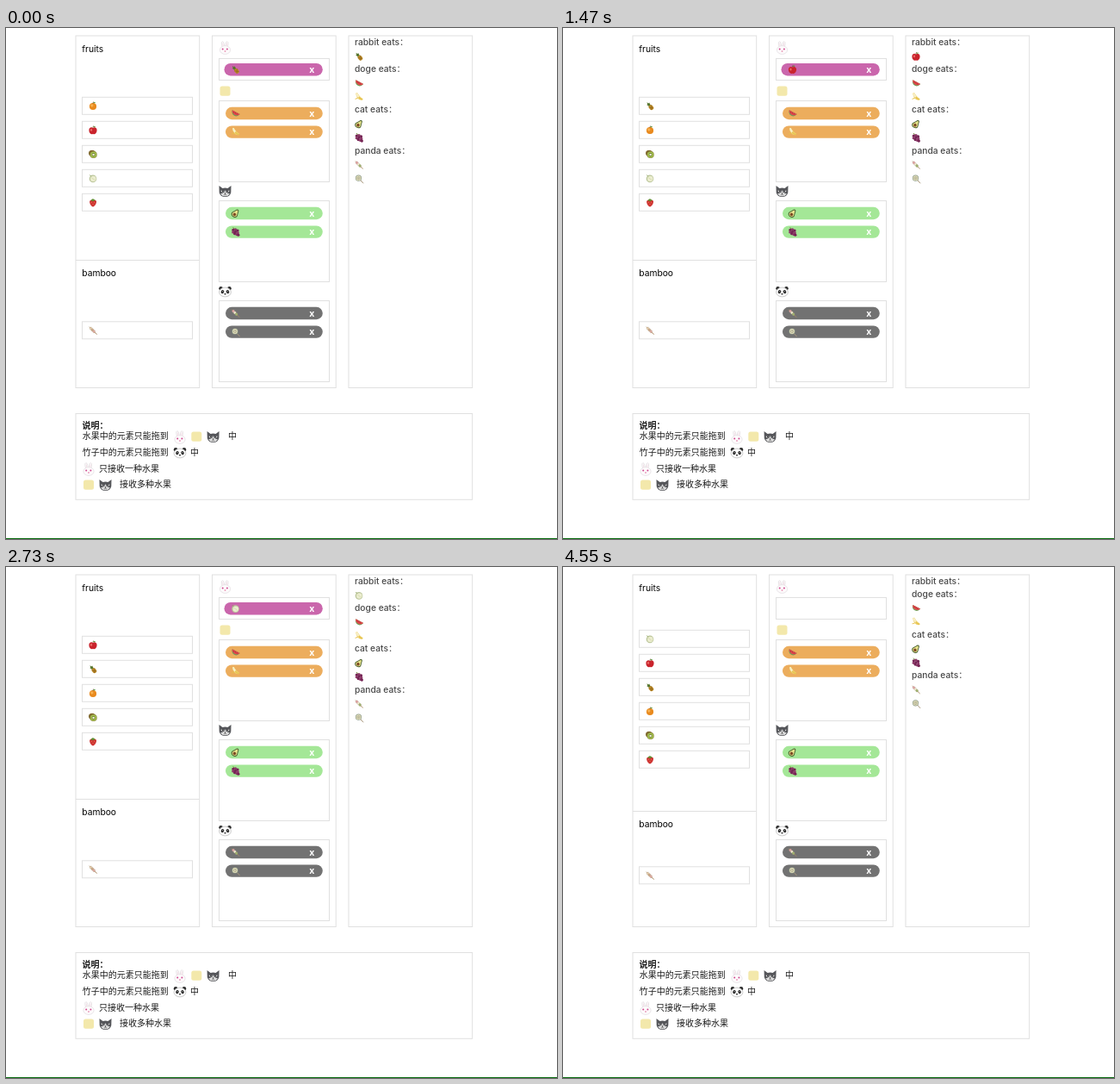
An HTML page for the animation above (4.62 s loop, 640 by 593 pixels).

```html
<!DOCTYPE html>
<html lang="zh-CN">
<head>
<meta charset="utf-8">
<title>Feeding board</title>
<style>
  html, body { margin: 0; width: 100%; height: 100%; overflow: hidden; background: #fff; }
  svg { display: block; width: 100%; height: 100%; }
  text { font: 10.25px Inter, "Noto Sans CJK SC", "Noto Sans CJK", sans-serif; white-space: pre; }
  .eats { fill: #484848; font-weight: 500; }
  .note { font-size: 10px; font-family: "Noto Sans CJK SC", "Noto Sans CJK", serif; fill: #1a1a1a; }
  .bold { font-weight: 700; }
  .close { font-size: 10.5px; font-weight: 700; fill: #fff; text-anchor: middle; }
  .frame { fill: none; stroke: #e0e0e0; }
</style>
</head>
<body>
<svg id="stage" viewBox="0 0 640 593" preserveAspectRatio="none"></svg>
<script>
const LOOP = 4620, STEP = 70;
const stage = document.getElementById('stage');

// Small drawing helpers
const dot = (x, y, r, fill, more = '') => `<circle cx="${x}" cy="${y}" r="${r}" fill="${fill}" ${more}/>`;
const oval = (x, y, rx, ry, fill, more = '') => `<ellipse cx="${x}" cy="${y}" rx="${rx}" ry="${ry}" fill="${fill}" ${more}/>`;
const path = (d, fill, more = '') => `<path d="${d}" fill="${fill}" ${more}/>`;
const line = (d, color, w, more = '') => path(d, 'none', `stroke="${color}" stroke-width="${w}" stroke-linecap="round" ${more}`);
const turn = (deg, body) => `<g transform="rotate(${deg})">${body}</g>`;
const text = (x, y, str, cls = '') => `<text x="${x}" y="${y}" class="${cls}">${str}</text>`;
const frame = (x1, y1, x2, y2) => `<rect class="frame" x="${x1}" y="${y1}" width="${x2 - x1}" height="${y2 - y1}"/>`;
const icon = (name, x, y, more = '') => `<use href="#${name}" x="${x}" y="${y}" ${more}/>`;

const skewer = colors => turn(-45,
  line('M0-5.6V6.2', '#a98a62', 0.9) +
  colors.map((c, i) => dot(0, -3.4 + i * 2.5, 1.5, c, 'stroke="#a59a83" stroke-width=".3"')).join(''));

const leafTop = line('M0-3.2L.5-4.6', '#6d4a25', 0.7) + path('M.3-3.5Q1.4-5.2 3-4.3Q2.2-3 .3-3.5Z', '#4b8f2c');

const grapeSpots = [[-2.6, -2.2], [0, -2.8], [2.5, -1.5], [-2.7, .3], [0, -.2], [2.7, 1.1], [-.8, 2.1], [1.5, 2.9], [3.3, 3.6]];

const icons = {
  orange: dot(0, .5, 4.1, '#e98a1e') + dot(-1.2, -.6, 1.7, '#f6b050') + leafTop,
  apple: path('M0-2.6C2-4.2 4.8-2.8 4.6.4C4.4 3 2.6 5 .9 4.7Q0 4.4-.9 4.7C-2.6 5-4.5 3-4.6.4C-4.8-2.8-2-4.2 0-2.6Z', '#c9232c') +
    oval(-2, -.3, 1.1, 1.5, '#ea6a64') + leafTop,
  kiwi: oval(-1, -1.3, 4, 3.5, '#80692f') + dot(.6, .5, 4.1, '#86803a') + dot(.6, .5, 3.5, '#a4c04c') +
    dot(.6, .5, 1.9, '#5c6c2c') + dot(.6, .5, 1.3, '#f3f2d2'),
  melon: dot(0, .4, 4.3, '#bac59a') + dot(.3, .5, 3.3, '#ebedcf') +
    line('M-2.2-1.2L2.4 2.2', '#d3d9ae', 0.8) + line('M-2.4-2.6L-3.4-3.7', '#8ba05a', 0.9),
  strawberry: path('M-3.8-1.5C-3-3.8 3-3.8 4-1.5C4.4 1 1.7 5 0 5C-1.8 5-4.3 1-3.8-1.5Z', '#cf3433') +
    [[-1.8, 0], [1.6, .2], [0, 2]].map(([x, y]) => dot(x, y, .4, '#f3c66a')).join('') +
    path('M-3.1-2.3L-1.3-3.6L0-4.6L1.2-3.6L3.1-2.4L1.2-2.1L0-1.3L-1.3-2.1Z', '#5d9132'),
  pineapple: turn(-40,
    oval(0, 2.1, 2.4, 3.2, '#bd8a26') + line('M-1.8 .6L1.4 4.2M1.8 .6L-1.4 4.2', '#7d5a1c', 0.5) +
    path('M-1.2-.6L-2-3.6L-.8-3.3L0-5.6L.8-3.3L2-3.6L1.2-.6Z', '#55742c')),
  watermelon: turn(28,
    path('M-5-1.5H5Q4.2 3 0 3.1Q-4.2 3-5-1.5Z', '#6ea05a') + path('M-5-1.5H5Q4 1.9 0 2Q-4 1.9-5-1.5Z', '#e5474c') +
    [-2, 0, 2].map(x => dot(x, -.1, .4, '#4b1d1c')).join('')),
  banana: path('M-3.6-4.6L-1.8-4.8C-.4-2.6 1 .4 4.4 1.9L4.2 3.4C1 4.6-3.6 1.2-3.6-4.6Z', '#ecd06a') +
    path('M-3.4-4.4L-1.8-4.6Q-1-2.6 .6-.8L-.8 1.4Q-3.4-1-3.4-4.4Z', '#f8efc8') +
    line('M-1.6 1.2Q-2.8 2.2-4 2.2M0 .4Q2 3 3.8 2.8', '#e6c04a', 1.1),
  avocado: turn(38,
    path('M0-5.2C2-5.2 2 -2.2 3.2-.3C5 3 2.6 5 0 5C-2.6 5-5 3-3.2-.3C-2-2.2-2-5.2 0-5.2Z', '#43592a') +
    path('M0-4.2C1.2-4.2 1.3-1.7 2.4 0C3.7 2.6 2 4.1 0 4.1C-2 4.1-3.7 2.6-2.4 0C-1.3-1.7-1.2-4.2 0-4.2Z', '#e6e38c') +
    dot(0, 1.7, 1.8, '#7d4c26')),
  grapes: line('M-1-3L-2.6-5', '#6f8a37', 1) +
    grapeSpots.map(([x, y], i) => dot(x, y, 1.65, i % 2 ? '#8d3868' : '#742454')).join(''),
  oden: skewer(['#e7cfb0', '#cda887', '#e0a9a0']),
  dango: skewer(['#e5a3a8', '#f1ead0', '#9fb46c']),
  lollipop: line('M1 1L4.8 5.2', '#a8977c', 1) + dot(-.5, -.6, 3.6, '#8c9a88') + dot(-.5, -.6, 2.9, '#e4e0bc') +
    line('M-.5-.6q1-1 1.4.3q0 1.5-1.8 1.4q-1.8-.7-1.1-2.4q1.3-1.4 3-.2', '#9a9a80', 0.7),
  rabbit: `<g fill="#fdfbfc" stroke="#dcd6da" stroke-width=".6">
    <ellipse cx="-2.6" cy="-3.8" rx="1.5" ry="3.6" transform="rotate(-10 -2.6 -3.8)"/>
    <ellipse cx="2" cy="-3.8" rx="1.5" ry="3.6" transform="rotate(8 2 -3.8)"/>
    <ellipse cy="2.5" rx="6.1" ry="4.9"/></g>` +
    oval(-2.6, -3.8, .5, 2, '#f4dfe7') + oval(2, -3.8, .5, 2, '#f4dfe7') + oval(0, 1.6, 4, 2.6, '#fdfbfc') +
    dot(-2.8, 1.5, 1, '#cf4a90') + dot(2.4, 1.5, 1, '#cf4a90') + oval(0, 4, 1, .7, '#e27ba4'),
  doge: '<rect x="-6" y="-5.6" width="12" height="11.4" rx="2.5" fill="#f3e8ab"/>',
  cat: path('M-7-6.6L-3-3.6Q0-4.3 3-3.6L7-6.6L6.8 1.5Q5.6 6.4 0 6.5Q-5.6 6.4-6.8 1.5Z', '#55565a') +
    path('M-5.4 3Q-3 2.4-1 .9L0-1.6L1 .9Q3 2.4 5.4 3Q3.8 5.7 0 5.8Q-3.8 5.7-5.4 3Z', '#dedede') +
    path('M-4.9-1L-1.7.1Q-2.8 1.5-4.6.5ZM4.9-1L1.7.1Q2.8 1.5 4.6.5Z', '#efefef') +
    dot(-3, .1, .7, '#222') + dot(3, .1, .7, '#222') + dot(0, 2.6, .8, '#444') + line('M-1.4 4.3Q0 3.5 1.4 4.3', '#555', 0.6),
  panda: dot(-4.9, -3.8, 2.3, '#2b2b2b') + dot(4.9, -3.8, 2.3, '#2b2b2b') +
    oval(0, .5, 6.9, 5.4, '#fbfbfb', 'stroke="#b5b5b5" stroke-width=".7"') +
    oval(-3, .1, 1.7, 2.1, '#222', 'transform="rotate(25 -3 .1)"') + oval(3, .1, 1.7, 2.1, '#222', 'transform="rotate(-25 3 .1)"') +
    dot(-2.8, -.2, .5, '#fff') + dot(2.8, -.2, .5, '#fff') + oval(0, 2.8, 1.2, .8, '#222')
};

const pill = (name, y, color, x = 255) =>
  `<rect x="${x}" y="${y}" width="${367.8 - x}" height="14.4" rx="7.2" fill="${color}"/>` +
  icon(name, 266.5, y + 7.2) + text(355.3, y + 10.9, 'x', 'close');

const row = (name, y) => frame(88.5, y, 216.5, y + 20) + icon(name, 101, y + 10.2);

// Parts that never change
const pets = [
  { name: 'rabbit', y: 23, box: [35.5, 60.5], color: '#ca66ac', food: [] },
  { name: 'doge', y: 73, box: [84.5, 178.5], color: '#ecad5d', food: ['watermelon', 'banana'] },
  { name: 'cat', y: 189.5, box: [200.5, 294.5], color: '#a4e797', food: ['avocado', 'grapes'] },
  { name: 'panda', y: 306, box: [316.5, 410.5], color: '#727272', food: ['dango', 'lollipop'] }
];

const board = [0, 1, 2].map(i => 81 + i * 158.5).map(x => frame(x, 9, x + 143.7, 417.5)).join('') +
  pets.map(p => icon(p.name, 254.5, p.y) + frame(247.5, p.box[0], 375.5, p.box[1]) +
    p.food.map((f, i) => pill(f, p.box[0] + 7.3 + i * 21.6, p.color)).join('')).join('') +
  text(88.3, 27.5, 'fruits');

const notes = frame(81, 447.5, 541.7, 547.3) +
  text(88.5, 464.6, '说明：', 'note bold') +
  text(88.7, 477.4, '水果中的元素只能拖到', 'note') +
  icon('rabbit', 202, 475) + icon('doge', 221.3, 474) + icon('cat', 240.6, 474.5) + text(258, 477.4, '中', 'note') +
  text(88.7, 496, '竹子中的元素只能拖到', 'note') + icon('panda', 202, 493) + text(214, 496, '中', 'note') +
  icon('rabbit', 96, 512) + text(108, 514.7, '只接收一种水果', 'note') +
  icon('doge', 96, 530) + icon('cat', 115.5, 530.5) + text(132, 533.4, '接收多种水果', 'note');

stage.innerHTML =
  '<defs>' + Object.entries(icons).map(([id, body]) => `<g id="${id}">${body}</g>`).join('') + '</defs>' +
  board + notes + '<rect y="592" width="640" height="1" fill="#0a6e10"/>' +
  '<g id="lists"></g><g id="ghost" opacity=".5"></g>';
const lists = document.getElementById('lists');
const ghost = document.getElementById('ghost');

// What the rabbit holds and what is left, from each moment on
const states = [
  { from: 0, held: 'pineapple', left: ['orange', 'apple', 'kiwi', 'melon', 'strawberry'] },
  { from: 910, held: 'apple', left: ['pineapple', 'orange', 'kiwi', 'melon', 'strawberry'] },
  { from: 2520, held: 'melon', left: ['apple', 'pineapple', 'orange', 'kiwi', 'strawberry'] },
  { from: 4270, held: '', left: ['melon', 'apple', 'pineapple', 'orange', 'kiwi', 'strawberry'] }
];

const drags = [
  { name: 'apple', start: 140, arrive: 630, drop: 910, a: [88.5, 108], b: [266.8, 38] },
  { name: 'melon', start: 1680, arrive: 2240, drop: 2520, a: [88.5, 164], b: [275.5, 37.5] }
];

function drawLists({ held, left }) {
  const grow = held ? 0 : 14;
  let out = left.map((f, i) => row(f, 80.3 - grow / 2 + i * 28)).join('') +
    `<path class="frame" d="M81 ${269.5 + grow}h143.7"/>` +
    text(88.3, 288 + grow, 'bamboo') + row('oden', 340.8 + grow / 2);
  if (held) out += pill(held, 41, pets[0].color, 253.5);

  let y = 20;
  for (const p of pets) {
    const food = p.name === 'rabbit' ? [held].filter(Boolean) : p.food;
    out += text(405, y, p.name + ' eats：', 'eats');
    food.forEach((f, i) => out += icon(f, 410, y + 13 + i * 16));
    y += 14.6 + food.length * 16.4;
  }
  lists.innerHTML = out;
}

const ease = p => p * p * (3 - 2 * p);
let shown, carried;

function render(ms) {
  const t = Math.floor((ms % LOOP) / STEP) * STEP;
  const state = states.filter(s => s.from <= t).pop();
  if (state !== shown) drawLists(shown = state);

  const drag = drags.find(d => t >= d.start && t < d.drop);
  if (drag !== carried) {
    carried = drag;
    ghost.innerHTML = drag ? frame(0, 0, 128, 20) + icon(drag.name, 12.5, 10.5) : '';
  }
  if (drag) {
    const p = ease(Math.min(1, (t - drag.start) / (drag.arrive - drag.start)));
    const [x, y] = drag.a.map((v, i) => v + (drag.b[i] - v) * p);
    ghost.setAttribute('transform', `translate(${x} ${y})`);
  }
}

const begin = performance.now();
function tick() {
  render(performance.now() - begin);
  requestAnimationFrame(tick);
}
tick();
</script>
</body>
</html>
```
